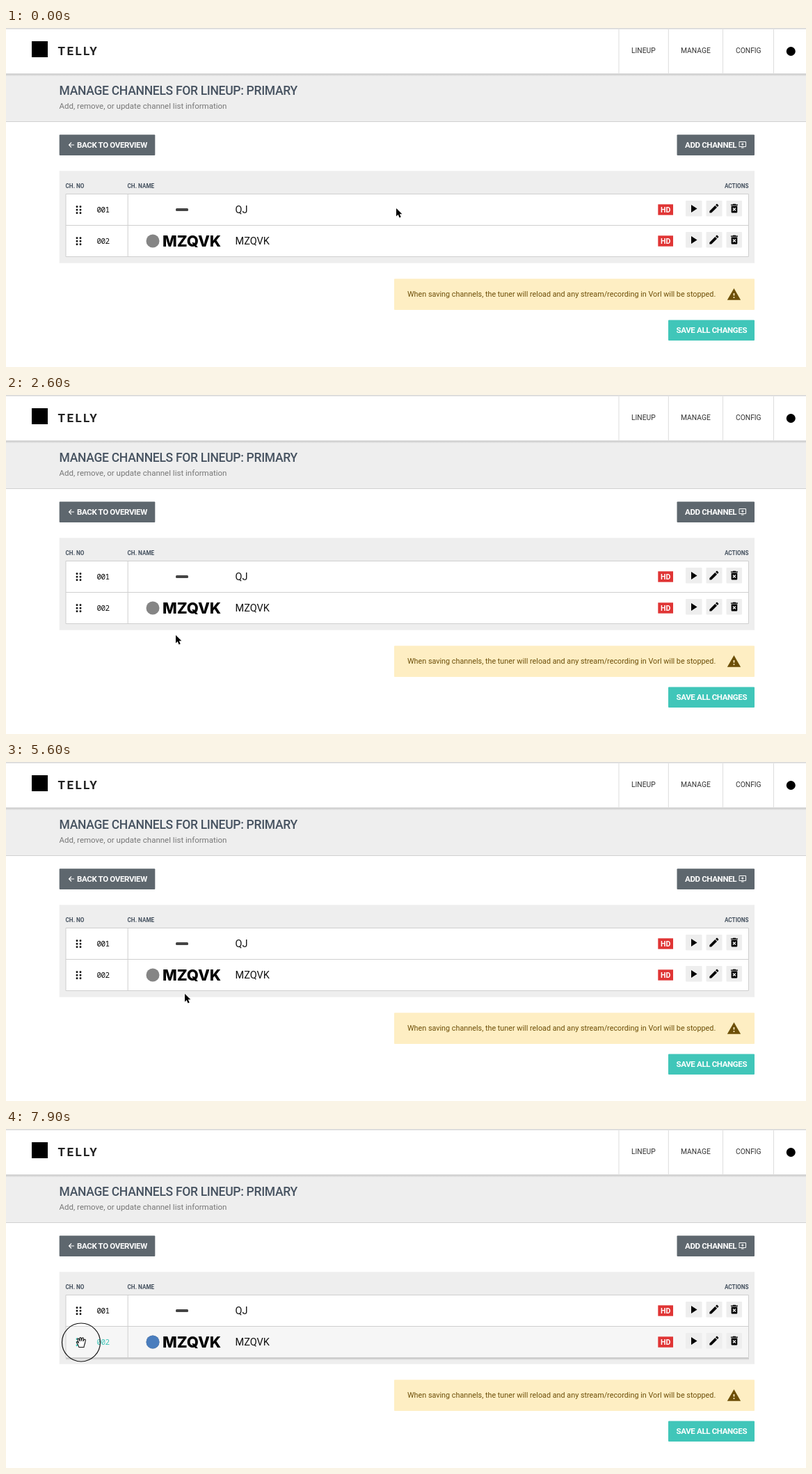
Animation, 1150 px wide and 487 px high, one loop 8 s. Source, as an HTML page:

```html
<!DOCTYPE html>
<html lang="en">
<head>
<meta charset="utf-8">
<title>Manage channels</title>
<style>
  html, body { margin: 0; width: 100%; height: 100%; overflow: hidden; background: #fff; }
  svg { display: block; width: 1150px; height: 487px; font-family: Roboto, sans-serif; }
  .nav { font-size: 10.3px; fill: #333; }
  .title { font-size: 17.5px; font-weight: 500; letter-spacing: -.3px; fill: #465260; }
  .button { font-size: 11.5px; font-weight: 600; letter-spacing: -.35px; fill: #fff; }
  .head { font-size: 8.2px; font-weight: 700; fill: #465260; }
  .number { font: 500 11px "Noto Sans Mono", monospace; letter-spacing: -.6px; }
  .name { font-size: 14.5px; fill: #111; }
  .badge { font-size: 10.5px; font-weight: 700; fill: #fff; }
  .wordmark { font: 800 22px Inter, sans-serif; letter-spacing: -.1px; }
</style>
</head>
<body>
<svg viewBox="0 0 1150 487">
  <defs>
    <linearGradient id="shade" x2="0" y2="1">
      <stop stop-color="#000" stop-opacity=".18"/>
      <stop offset="1" stop-color="#000" stop-opacity="0"/>
    </linearGradient>
    <g id="dots">
      <path d="M102 256.7h.01M102 261.2h.01M102 265.7h.01M107 256.7h.01M107 261.2h.01M107 265.7h.01"
        fill="none" stroke="currentColor" stroke-width="2.9" stroke-linecap="round"/>
    </g>
    <g id="actions">
      <rect x="937.3" y="253.3" width="21.7" height="15.4" fill="#e03535"/>
      <text class="badge" x="948.2" y="264.8" text-anchor="middle">HD</text>
      <g fill="#eee">
        <rect x="977" y="248" width="23.5" height="22.5" rx="1"/>
        <rect x="1006.5" y="248" width="23" height="22.5" rx="1"/>
        <rect x="1035.5" y="248" width="22.5" height="22.5" rx="1"/>
      </g>
      <path d="M985 254v11l8.5-5.5z"/>
      <path transform="translate(1009.2 250.5) scale(.72)" d="M3 17.25V21h3.75L17.81 9.94l-3.75-3.75zM20.71 7.04c.39-.39.39-1.02 0-1.41l-2.34-2.34c-.39-.39-1.02-.39-1.41 0l-1.83 1.83 3.75 3.75z"/>
      <path transform="translate(1038.3 250.5) scale(.72)" d="M6 19c0 1.1.9 2 2 2h8c1.1 0 2-.9 2-2V7H6zm2.46-7.12l1.41-1.41L12 12.59l2.12-2.12 1.41 1.41L13.41 14l2.12 2.12-1.41 1.41L12 15.41l-2.12 2.12-1.41-1.41L10.59 14zM15.5 4l-1-1h-5l-1 1H5v2h14V4z"/>
    </g>
  </defs>

  <!-- header -->
  <path fill="#dadada" d="M0 0h1150v1.7H0z"/>
  <rect x="37" y="19" width="23" height="23"/>
  <text x="74.5" y="38.5" font-size="17" font-weight="600" letter-spacing="2.4" fill="#222">TELLY</text>
  <path stroke="#ddd" d="M881 2v63M952.3 2v63M1030.5 2v63M1103.5 2v63"/>
  <g class="nav">
    <text x="899" y="36">LINEUP</text>
    <text x="970" y="36">MANAGE</text>
    <text x="1049" y="36">CONFIG</text>
  </g>
  <circle cx="1128.3" cy="33.5" r="6.5"/>
  <path fill="#eee" d="M0 65.5h1150v69.5H0z"/>
  <rect y="65.5" width="1150" height="4" fill="url(#shade)"/>
  <path stroke="#d0d0d0" d="M0 134.5h1150"/>
  <text class="title" x="76.5" y="96">MANAGE CHANNELS FOR LINEUP: PRIMARY</text>
  <text x="76.5" y="116" font-size="11.5" fill="#777">Add, remove, or update channel list information</text>

  <!-- buttons -->
  <rect x="76.7" y="153.3" width="137.6" height="29.7" rx="1" fill="#5e676e"/>
  <path d="M98 168h-7.5m3.5-3.5-3.5 3.5 3.5 3.5" fill="none" stroke="#fff" stroke-width="1.1"/>
  <text class="button" x="102" y="171.5">BACK TO OVERVIEW</text>
  <rect x="964.5" y="153.3" width="111.5" height="29.7" rx="1" fill="#5e676e"/>
  <text class="button" x="976" y="171.5">ADD CHANNEL</text>
  <path d="M1054 163.5h9.5v7h-9.5zM1057 172h3.5M1058.8 165.2v3.6M1057 167h3.6" fill="none" stroke="#fff"/>

  <!-- channel table -->
  <path fill="#eee" d="M76.7 205.3h999.3v132.4H76.7z"/>
  <g class="head">
    <text x="85.5" y="230">CH. NO</text>
    <text x="174.5" y="230">CH. NAME</text>
    <text x="1067.5" y="230" text-anchor="end">ACTIONS</text>
  </g>
  <path fill="#fff" d="M86 238h982v91H86z"/>
  <rect id="row" x="86" y="284" width="982" height="45" fill="#f6f6f6"/>
  <path fill="none" stroke="#cfcfcf" d="M86 238.5h981.5v90H86zM86 283.5h982M175.2 238.5v90"/>
  <rect id="lift" x="86" y="329" width="982" height="3" fill="url(#shade)"/>

  <use href="#dots" color="#111"/>
  <text class="number" x="130.5" y="264.5">001</text>
  <rect x="244" y="259" width="18" height="4" rx="1.5" fill="#444"/>
  <text class="name" x="329.5" y="266">QJ</text>
  <use href="#actions"/>

  <g id="handle">
    <use href="#dots" y="45"/>
    <text class="number" x="130.5" y="309.5" fill="currentColor">002</text>
  </g>
  <circle cx="211" cy="306" r="9.5" fill="#858585"/>
  <circle id="tint" cx="211" cy="306" r="9.5" fill="#4a7dbd"/>
  <text class="wordmark" x="225" y="314">MZQVK</text>
  <text class="name" x="329.5" y="311">MZQVK</text>
  <use href="#actions" y="45"/>

  <!-- notice and save -->
  <rect x="558" y="360.3" width="518" height="44.7" rx="1" fill="#feeec3"/>
  <text x="577" y="386" font-size="10.8" fill="#6d4f08">When saving channels, the tuner will reload and any stream/recording in Vorl will be stopped.</text>
  <path transform="translate(1035.9 372.2) scale(.88)" fill="#6d4f08" d="M1 21h22L12 2zm12-3h-2v-2h2zm0-4h-2v-4h2z"/>
  <rect x="952" y="419.5" width="124" height="29.5" rx="1" fill="#40c6b9"/>
  <text class="button" x="963.5" y="437.5">SAVE ALL CHANGES</text>

  <!-- pointer -->
  <g id="pointer">
    <path id="arrow" d="M0 0v11.6l2.7-2.5 1.9 4.3 2.1-.9-1.9-4.2h3.5z" stroke="#fff" stroke-width=".9" paint-order="stroke"/>
    <path id="hand" transform="scale(.88)" d="M-3.5 8Q-4 5-7 1-8-1-6-1L-4 1-6-5Q-6-7-4-6L-2-2-2.5-7Q-1-9 0-7L.5-2.5 1.5-7Q3-8.5 4-6.5L3.3-2 5-4.5Q7-5.5 7.2-3.5 6.5 2 5 5L4.5 8z" fill="#fff" stroke="#111" stroke-width="1.2" stroke-linejoin="round"/>
    <circle id="ring" r="27.5" fill="none" stroke="#111" stroke-width="1.2"/>
  </g>
</svg>
<script>
  const LOOP = 8000, STEP = 100;
  const HAND_AT = 7500, PRESS_AT = 7700;

  // Each key is [time, ...values].
  const path = [
    [0, 561, 259], [1100, 260, 333], [1200, 260, 333], [2600, 244, 345], [3800, 248, 345],
    [4200, 252, 328], [4500, 252, 353], [5600, 257, 333], [6500, 262, 325],
    [6800, 265, 367], [7600, 108, 306.5], [8000, 108, 306.5]
  ];
  const hover = [
    [0, 0], [3900, 0], [4200, .7], [4500, .35], [4700, 0], [6300, 0], [6600, 1],
    [6800, .65], [7000, 0], [7300, 0], [7600, 1], [8000, 1]
  ];

  const el = id => document.getElementById(id);
  const [row, lift, handle, tint, pointer, arrow, hand, ring] =
    ['row', 'lift', 'handle', 'tint', 'pointer', 'arrow', 'hand', 'ring'].map(el);
  const show = (node, on) => node.setAttribute('visibility', on ? 'visible' : 'hidden');

  function sample(keys, t) {
    const next = keys.findIndex(key => key[0] > t);
    const a = keys[next - 1], b = keys[next];
    const u = (t - a[0]) / (b[0] - a[0]);
    const ease = u * u * (3 - 2 * u);
    return a.slice(1).map((v, i) => v + (b[i + 1] - v) * ease);
  }

  function draw(now) {
    const t = Math.floor(now % LOOP / STEP) * STEP;
    const [x, y] = sample(path, t);
    const [lit] = sample(hover, t);
    const teal = Math.max(0, (lit - .3) / .7);
    const mix = (from, to) => Math.round(from + (to - from) * teal);

    for (const part of [row, lift, tint]) part.setAttribute('opacity', lit);
    handle.setAttribute('color', `rgb(${mix(17, 64)},${mix(17, 198)},${mix(17, 185)})`);

    pointer.setAttribute('transform', `translate(${x} ${y})`);
    show(arrow, t < HAND_AT);
    show(hand, t >= HAND_AT);
    show(ring, t >= PRESS_AT);
    requestAnimationFrame(draw);
  }
  requestAnimationFrame(draw);
</script>
</body>
</html>
```
